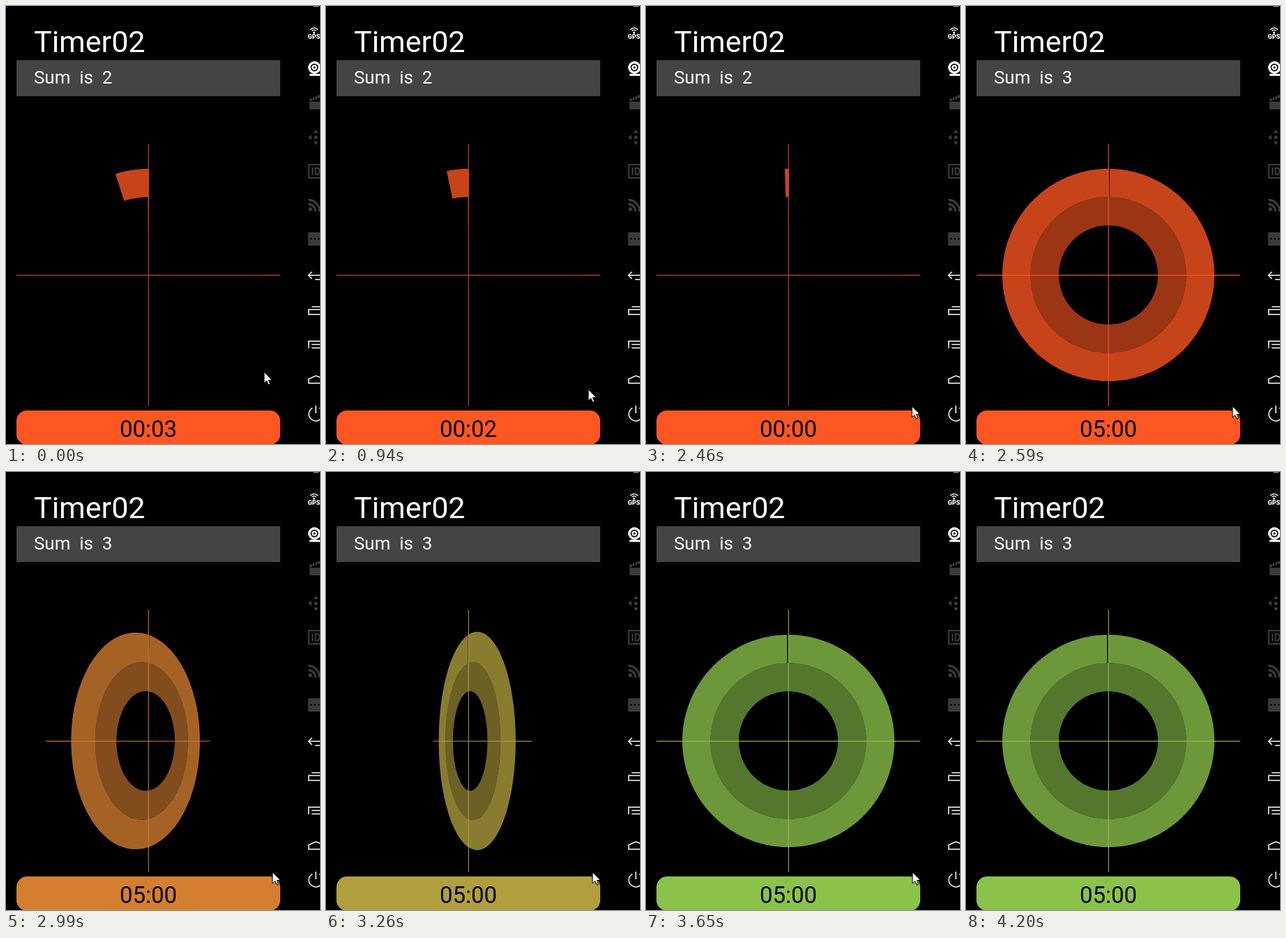
Write an HTML page with a canvas that moves like this. It is 450 px wide and 627 px high and loops after 7.01 s.

```html
<!DOCTYPE html>
<html lang="en">
<head>
<meta charset="utf-8">
<title>Timer</title>
<style>
html, body { margin: 0; width: 100%; height: 100%; overflow: hidden; background: #000; }
canvas { display: block; width: 450px; height: 627px; }
</style>
</head>
<body>
<canvas id="stage" width="450" height="627"></canvas>
<script>
const ctx = document.getElementById('stage').getContext('2d');
const LOOP = 7010, STEP = 136, LEAD = 22;
const RAD = Math.PI / 180;
const CX = 204, CY = 385, CAMERA = 620;
const RESET = 2550, FLIP_START = 2727, FLIP_TIME = 878, POINTER_GONE = 4200;
const ORANGE = [255, 87, 34], GREEN = [139, 195, 74];
const WHITE = '#fff', GRAY = '#3b3b3b', BLACK = '#000';

const ramp = (t, from, to) => Math.max(0, Math.min(1, (t - from) / (to - from)));
const rgba = (c, a = 1) => `rgba(${c.map(Math.round).join()},${a})`;

function text(str, x, y, size, color = WHITE, align = 'left', weight = 400) {
  ctx.font = `${weight} ${size}px Roboto, sans-serif`;
  ctx.textAlign = align;
  ctx.fillStyle = color;
  ctx.fillText(str, x, y);
}

function path(points) {
  ctx.beginPath();
  points.forEach(([x, y]) => ctx.lineTo(x, y));
}

function fillPoly(color, ...points) {
  path(points);
  ctx.fillStyle = color;
  ctx.fill();
}

function line(color, width, ...points) {
  path(points);
  ctx.strokeStyle = color;
  ctx.lineWidth = width;
  ctx.stroke();
}

function rect(color, x, y, w, h) {
  ctx.fillStyle = color;
  ctx.fillRect(x, y, w, h);
}

function disc(color, x, y, r) {
  ctx.beginPath();
  ctx.arc(x, y, r, 0, 2 * Math.PI);
  ctx.fillStyle = color;
  ctx.fill();
}

function arc(color, width, x, y, r, from, to) {
  ctx.beginPath();
  ctx.arc(x, y, r, from * RAD, to * RAD);
  ctx.strokeStyle = color;
  ctx.lineWidth = width;
  ctx.stroke();
}

// Perspective turn about the vertical axis
function project(x, y, turn) {
  const scale = 1 / (1 + x * Math.sin(turn) / CAMERA);
  return [CX + x * Math.cos(turn) * scale, CY + y * scale];
}

function sector(inner, outer, sweep, color, turn) {
  const steps = Math.max(4, Math.ceil(sweep / 2));
  const edge = r => Array.from({ length: steps + 1 }, (_, i) => {
    const a = sweep * i / steps * RAD;
    return project(-r * Math.sin(a), -r * Math.cos(a), turn);
  });
  fillPoly(color, ...edge(outer), ...edge(inner).reverse());
}

function drawDial(t, color) {
  const running = t < RESET;
  const turn = Math.PI * ramp(t, FLIP_START, FLIP_START + FLIP_TIME);
  const left = 18.1 - 6.6 * t / 1000;
  sector(71, 111.5, running ? left / 60 : 360, rgba(color, 0.61), turn);
  sector(111.5, 152, running ? left : 359.2, rgba(color, 0.78), turn);
  const ink = rgba(color, running ? 0.78 : 0.9);
  line(ink, 1.2, project(-189, 0.3, turn), project(189, 0.3, turn));
  line(ink, 1.2, [CX + 0.3, CY - 188], [CX + 0.3, CY + 188]);
}

function drawPanel(t, color) {
  const running = t < RESET;
  text('Timer02', 40, 66, 43);
  rect('#444', 15, 77.5, 378, 51.5);
  text('Sum  is  ' + (running ? 2 : 3), 40, 111, 25.9);
  ctx.beginPath();
  ctx.roundRect(15, 579, 378, 49, 15);
  ctx.fillStyle = rgba(color);
  ctx.fill();
  const seconds = Math.floor(3.8 - t / 870);
  text(running ? '00:0' + seconds : '05:00', CX, 616.5, 33, BLACK, 'center');
}

function drawGps() {
  disc(WHITE, 441.5, 38, 1.5);
  for (const r of [3.6, 6.6]) arc(WHITE, 1.4, 441.5, 38, r, 215, 325);
  text('GPS', 432.5, 47, 9, WHITE, 'left', 900);
}

function drawWebcam() {
  [9, 5.5, 3.8, 1.6].forEach((r, i) => disc(i % 2 ? BLACK : WHITE, 442, 88, r));
  rect(WHITE, 435, 97, 15, 3);
}

function drawClapper() {
  rect(GRAY, 435, 137, 15, 11);
  line(GRAY, 4, [435, 135], [450, 129]);
  for (let x = 438; x < 450; x += 4) line(BLACK, 1, [x, 130], [x + 2, 137]);
}

function drawPad() {
  disc(GRAY, 444, 188, 2.6);
  for (let i = 0; i < 4; i++) {
    ctx.save();
    ctx.translate(444, 188);
    ctx.rotate(i * Math.PI / 2);
    fillPoly(GRAY, [0, -11], [3.5, -6], [-3.5, -6]);
    ctx.restore();
  }
}

function drawFeed() {
  disc(GRAY, 436, 291, 2.8);
  for (const r of [10.5, 16.5]) arc(GRAY, 3, 433, 294, r, -90, 0);
}

function drawToolbar() {
  rect('#aaa', 441, 0, 7, 1);
  drawGps();
  drawWebcam();
  drawClapper();
  drawPad();
  line(GRAY, 2, [450, 227], [434, 227], [434, 246], [450, 246]);
  text('ID', 437, 242, 15, GRAY, 'left', 700);
  drawFeed();
  rect(GRAY, 433, 324, 17, 19);
  for (let x = 436; x < 450; x += 5.5) rect(BLACK, x, 332, 2.4, 2.5);

  const stroke = (...points) => line(WHITE, 1.5, ...points);
  const bar = (x, y) => stroke([x, y], [450, y]);
  bar(434, 385.5);
  stroke([438.5, 380.5], [433.5, 385.5], [438.5, 390.5]);
  bar(443, 391.5);
  stroke([450, 434.5], [433.7, 434.5], [433.7, 441.5], [450, 441.5]);
  bar(438, 430.5);
  stroke([433.7, 490], [433.7, 479.7], [450, 479.7]);
  for (const y of [484.5, 489.5]) bar(438, y);
  stroke([450, 540], [433.7, 540], [433.7, 534], [444, 529.2], [450, 531.5]);
  arc(WHITE, 1.5, 444, 584, 10, -60, 240);
  stroke([444, 572], [444, 583]);
}

function drawPointer(t) {
  if (t >= POINTER_GONE) return;
  const leave = ramp(t, 3930, 4050);
  ctx.save();
  ctx.translate(
    370 + 6 * ramp(t, 150, 544) + 4 * ramp(t, 952, 1200) + 2 * ramp(t, 2312, 2550) + 5 * leave,
    524 + 25 * ramp(t, 272, 544) + 24 * ramp(t, 2040, 2312) + 25 * leave);
  path([[0, 0], [0, 16], [3.6, 12.6], [6.2, 18.2], [8.6, 17], [6.2, 11.6], [11, 11.2]]);
  ctx.closePath();
  ctx.fillStyle = WHITE;
  ctx.fill();
  ctx.strokeStyle = BLACK;
  ctx.lineWidth = 1;
  ctx.stroke();
  ctx.restore();
}

function draw(time) {
  // The screen refreshes at a fixed, coarse rate
  const t = Math.floor((time + LEAD) / STEP) * STEP;
  const mix = ramp(t, FLIP_START - 50, FLIP_START - 50 + FLIP_TIME);
  const color = ORANGE.map((v, i) => v + (GREEN[i] - v) * mix);
  rect(BLACK, 0, 0, 450, 627);
  drawPanel(t, color);
  drawDial(t, color);
  drawToolbar();
  drawPointer(t);
}

const start = performance.now();
function tick() {
  draw((performance.now() - start) % LOOP);
  requestAnimationFrame(tick);
}
tick();
</script>
</body>
</html>
```
